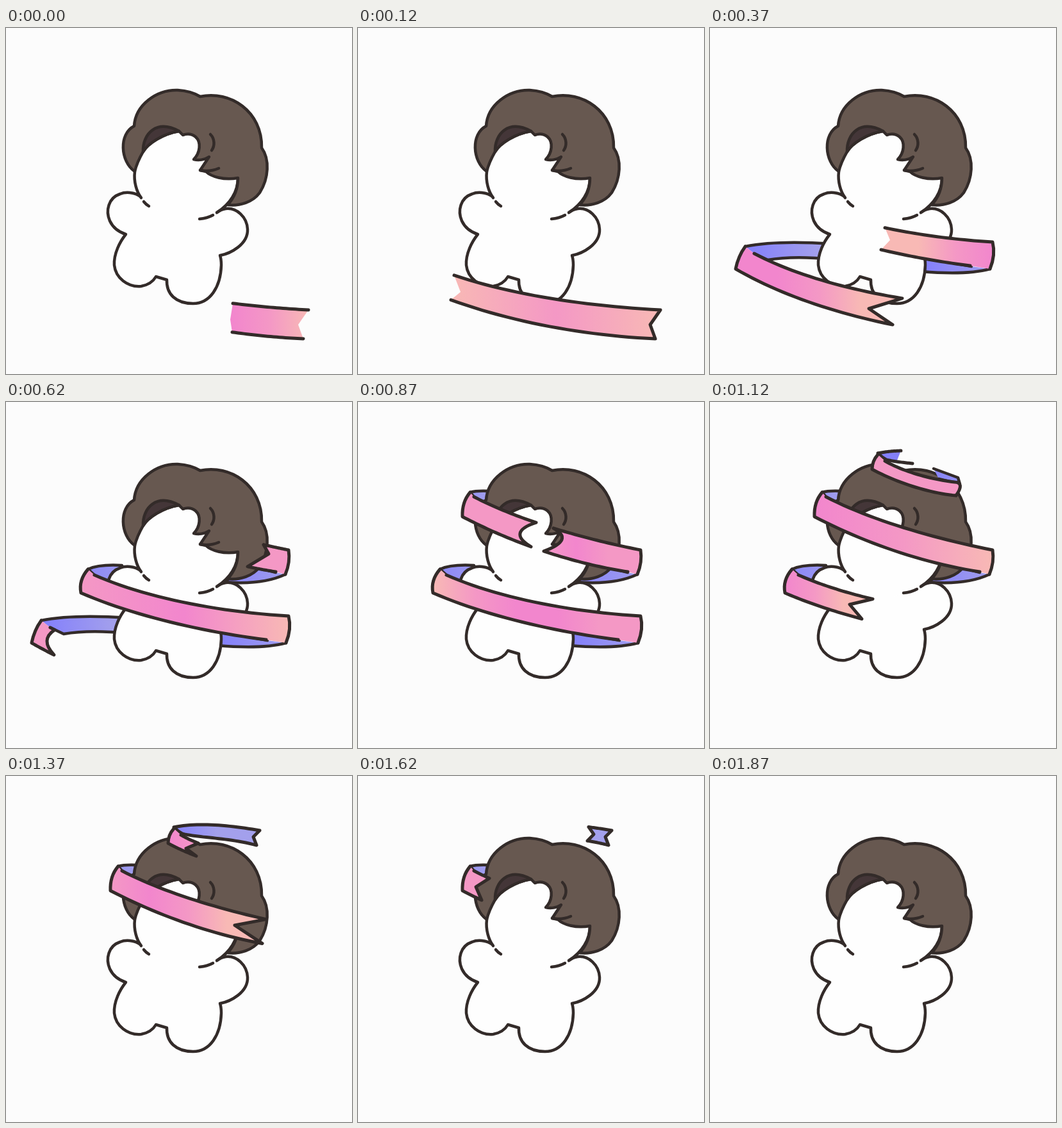
An HTML page with a canvas for the animation above (2 s loop, 540 by 540 pixels).

```html
<!DOCTYPE html>
<html lang="en">
<head>
<meta charset="utf-8">
<title>Ribbon twirl</title>
<style>
html, body { margin: 0; width: 100%; height: 100%; overflow: hidden; background: #fcfcfc; }
canvas { display: block; width: 100vw; height: 100vh; }
</style>
</head>
<body>
<canvas id="stage" width="540" height="540"></canvas>
<script>
const ctx = document.getElementById('stage').getContext('2d');
const INK = '#332b29', WHITE = '#fefefe', HAIR = '#675850', SHADE = '#443638';
const TONES = { p: '#f286cd', m: '#f498c5', o: '#f8b9b5', b: '#8480fb', l: '#a3a0ec' };

// Each band: upper and lower edge as cubics, then the corners and bends of both folds.
const BANDS = {
  hip: { top: [69, 352, 170, 405, 320, 432, 472, 440], bottom: [40, 376, 150, 440, 310, 478, 464, 485],
    left: [44, 356, 55, 341] },
  waist: { top: [138, 270, 215, 304, 325, 327, 441, 334], bottom: [117, 298, 200, 334, 310, 359, 406, 371],
    left: [113, 278, 128, 261], right: [446, 354, 437, 376] },
  brow: { top: [181, 148, 250, 184, 350, 213, 441, 231], bottom: [163, 179, 240, 219, 330, 251, 421, 265],
    left: [162, 156, 175, 141], right: [444, 250, 436, 269] },
  crown: { top: [273, 92, 300, 108, 345, 121, 382, 125], bottom: [253, 105, 290, 125, 340, 142, 384, 146],
    left: [253, 92, 262, 82], right: [398, 126, 384, 146] },
  tip: { top: [262, 80, 300, 72, 350, 77, 396, 85], bottom: [275, 90, 305, 97, 345, 96, 391, 108],
    left: [268, 86, 262, 80] }
};

// Inner side of the ribbon where it passes behind the figure.
const BACKS = {
  hipL: 'M69 352L90 362Q130 355 190 361V337Q105 331 55 341',
  hipR: 'M437 376Q400 386 330 380V358L408 372',
  waistL: 'M181 255Q145 253 128 261L140 272L175 290',
  waistR: 'M436 269Q400 286 340 281L380 255L421 266',
  browL: 'M205 139Q185 138 175 141L181 148L215 168',
  crownR: 'M349 104L387 118L390 128L357 120'
};

const piece = (band, tones, left, right) => ({ band, tones, left, right });
// An end is [upper tip x, notch x, notch y, lower tip x, style].
const hook = piece('hip', 'mm', null, [76, 64, 373, 75, 'round']);
const waist = piece('waist', 'mpo');
const brow = piece('brow', 'pmo');
const crown = piece('crown', 'mm');

const POSES = [
  { front: [piece('hip', 'pmo', [354, 350, 455, 353, 'bare'], [472, 456, 463, 464, 'bare'])] },
  { front: [piece('hip', 'omo', [150, 160, 412, 145, 'bare'], [472, 456, 463, 464])] },
  { back: ['hipL'], front: [piece('hip', 'pmo', null, [415, 365, 458, 402])] },
  { back: ['hipL', 'hipR'], front: [
    piece('hip', 'ppmoo', null, [300, 248, 438, 285]),
    piece('waist', 'oomp', [273, 281, 331, 267, 'bare'])] },
  { back: ['hipL', 'hipR', 'waistL'], front: [piece('hip', 'pmo', null, [180, 134, 400, 165]), waist] },
  { back: ['hipL', 'hipR', 'waistL', 'waistR'], front: [
    hook, waist, piece('brow', 'mm', [402, 410, 237, 377])] },
  { back: ['hipR', 'waistL', 'waistR'], front: [waist, piece('brow', 'omm', [305, 318, 215, 290])] },
  { back: ['hipR', 'waistL', 'waistR', 'browL'], front: [
    piece('waist', 'omppmm'),
    piece('brow', 'mm', null, [278, 253, 205, 270, 'round']),
    piece('brow', 'mpmm', [305, 318, 215, 290, 'round'])] },
  { back: ['waistL', 'waistR', 'browL'], front: [
    piece('waist', 'pmo', null, [405, 358, 344, 390]), brow, piece('crown', 'mm', [325, 333, 126, 320])] },
  { back: ['waistL', 'waistR', 'browL'], over: ['crownR'], front: [
    piece('waist', 'pmoo', null, [254, 218, 316, 237]), brow,
    piece('tip', 'bb', null, [298, 292, 91, 316, 'bare']), crown] },
  { back: ['waistR', 'browL'], over: ['crownR'], front: [
    brow, piece('tip', 'bl', null, [375, 365, 93, 371]), crown] },
  { back: ['browL'], front: [
    piece('brow', 'mpmoo', null, [406, 357, 233, 400]),
    piece('tip', 'bll', null, [396, 386, 95, 391]),
    piece('crown', 'pm', null, [300, 281, 113, 297])] },
  { back: ['browL'], front: [
    piece('brow', 'pmo', null, [285, 240, 196, 270]),
    piece('tip', 'll', [325, 335, 87, 325], [396, 386, 95, 391])] },
  { back: ['browL'], front: [
    piece('brow', 'mm', null, [205, 184, 173, 193]),
    piece('tip', 'll', [360, 368, 91, 358], [396, 386, 95, 391])] },
  { front: [piece('tip', 'll', [378, 384, 93, 374], [396, 390, 95, 391])] },
  {}
];

function cubic(c, t) {
  const u = 1 - t;
  const at = i => u * u * u * c[i] + 3 * u * u * t * c[i + 2] + 3 * u * t * t * c[i + 4] + t * t * t * c[i + 6];
  return [at(0), at(1)];
}

function paramAt(c, x) {
  let lo = 0, hi = 1;
  for (let i = 0; i < 20; i++) {
    const mid = (lo + hi) / 2;
    if (cubic(c, mid)[0] < x) lo = mid; else hi = mid;
  }
  return lo;
}

function edge(c, left, right, tip) {
  const a = left ? paramAt(c, left[tip]) : 0;
  const b = right ? paramAt(c, right[tip]) : 1;
  return Array.from({ length: 25 }, (_, i) => cubic(c, a + (b - a) * i / 24));
}

function trace(path, points) {
  points.forEach(p => path.lineTo(...p));
}

function notch(path, from, end, to) {
  const [, x, y, , style] = end;
  if (style === 'round') {
    path.quadraticCurveTo(2 * x - (from[0] + to[0]) / 2, 2 * y - (from[1] + to[1]) / 2, ...to);
  } else {
    path.lineTo(x, y);
    path.lineTo(...to);
  }
}

function blend(tones, x0, x1) {
  const g = ctx.createLinearGradient(x0, 0, x1, 0);
  [...tones].forEach((k, i) => g.addColorStop(i / (tones.length - 1), TONES[k]));
  return g;
}

function ink(path, width = 4.5) {
  ctx.strokeStyle = INK;
  ctx.lineWidth = width;
  ctx.stroke(path);
}

function shape(d, fill, line = true) {
  const path = new Path2D(d);
  if (fill) {
    ctx.fillStyle = fill;
    ctx.fill(path);
  }
  if (line) ink(path);
}

function drawPiece({ band, tones, left, right }) {
  const b = BANDS[band];
  const top = edge(b.top, left, right, 0);
  const bottom = edge(b.bottom, left, right, 3).reverse();
  const topEnd = top[24], lowEnd = bottom[0], lowStart = bottom[24];
  const fill = new Path2D(), line = new Path2D();

  trace(fill, top);
  line.moveTo(...top[0]);
  trace(line, top);
  if (right) {
    notch(fill, topEnd, right, lowEnd);
    if (right[4] === 'bare') line.moveTo(...lowEnd);
    else notch(line, topEnd, right, lowEnd);
  } else {
    fill.quadraticCurveTo(...b.right);
    fill.lineTo(...lowEnd);
    line.quadraticCurveTo(...b.right);
    line.moveTo(...lowEnd);
  }
  trace(fill, bottom);
  trace(line, bottom);
  if (left) {
    notch(fill, lowStart, left, top[0]);
    if (left[4] !== 'bare') notch(line, lowStart, left, top[0]);
  } else {
    fill.quadraticCurveTo(...b.left);
    line.quadraticCurveTo(...b.left);
  }
  fill.closePath();
  ctx.fillStyle = blend(tones, Math.min(top[0][0], lowStart[0]), Math.max(topEnd[0], lowEnd[0]));
  ctx.fill(fill);
  ink(line, 5);
}

function drawBack(name) {
  const x = name === 'hipL' ? 60 : name.endsWith('L') ? 100 : 335;
  shape(BACKS[name], blend('bl', x, x + 110));
}

function drawBody() {
  shape('M211 264C200 255 185 256 178 259C160 265 155 285 162 301C168 314 178 319 187 322' +
    'C178 333 168 352 169 370C171 390 190 405 211 403C222 401 230 395 234 388L251 393' +
    'C250 415 265 430 292 430C318 430 335 405 336 370Q336 361 334 355' +
    'C350 352 378 338 377 314C376 295 360 280 343 282Q336 283 329 288', WHITE);
  shape('M276 164C240 165 203 200 201 232C202 250 206 258 211 265L270 310L329 288' +
    'C350 275 362 255 362 234L330 180Z', WHITE, false);
  shape('M201 224C199 240 204 256 211 265M362 234C362 255 350 275 329 288');
  shape('M215 271Q219 276 223 278M302 298Q314 297 323 292');
}

function drawHair() {
  shape('M200 153C202 120 235 96 268 97C283 98 295 102 303 107C350 97 400 130 399 187' +
    'C412 205 410 235 396 257C385 272 365 278 346 276C357 264 362 250 362 234' +
    'C340 238 320 232 312 224L303 222L317 201C310 206 300 207 293 205' +
    'C303 195 305 178 296 170C290 165 282 165 276 167L270 161' +
    'C245 165 222 180 214 193C206 207 203 215 201 224C178 208 176 165 200 153Z', HAIR);
  shape('M214 193C213 165 235 142 270 161C245 165 222 180 214 193Z', SHADE);
  shape('M319 166C326 173 326 184 321 191M303 222Q318 225 332 219');
}

function draw(step) {
  const { back = [], over = [], front = [] } = POSES[step];
  ctx.fillStyle = '#fcfcfc';
  ctx.fillRect(0, 0, 540, 540);
  ctx.lineCap = ctx.lineJoin = 'round';
  back.forEach(drawBack);
  drawBody();
  drawHair();
  over.forEach(drawBack);
  front.forEach(drawPiece);
}

function tick() {
  const t = Math.floor(performance.now() % 2000 / 10) * 10;
  draw(Math.floor((t + 5) / 125) % POSES.length);
  requestAnimationFrame(tick);
}
tick();
</script>
</body>
</html>
```
